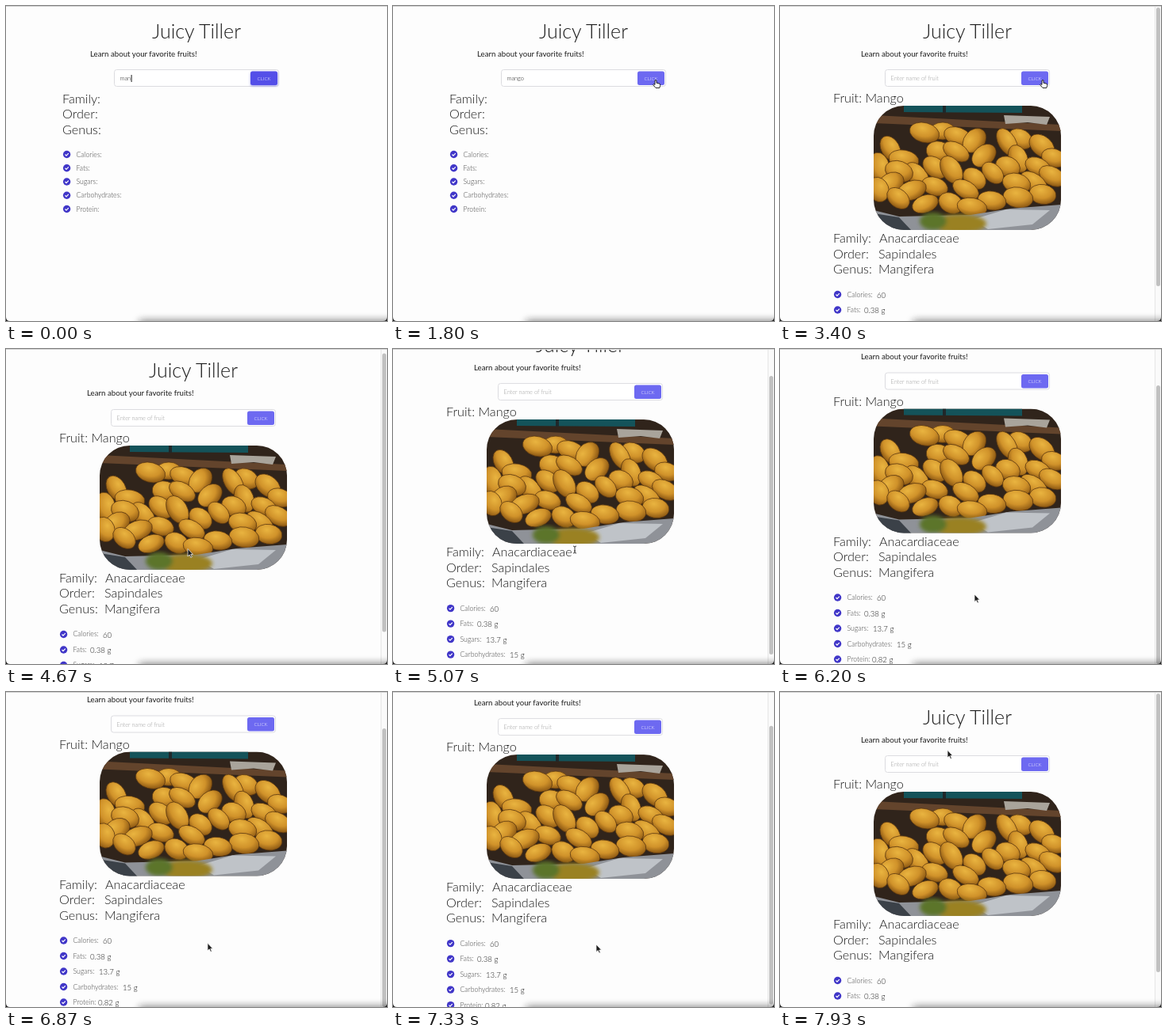
Recreate the animation shown at these times as an HTML page. Size 480 by 398 pixels, loop 8000 ms.

```html
<!DOCTYPE html>
<html lang="en">
<meta charset="utf-8">
<title>Juicy Tiller</title>
<style>
  html, body { margin: 0; width: 100%; height: 100%; overflow: hidden; background: #fdfdfd; }
  svg { display: block; width: 480px; height: 398px; font-family: Lato, sans-serif; font-weight: 300; fill: #1c1c1c; }
  .title { font-size: 25px; text-anchor: middle; }
  .intro { font-size: 9.7px; font-weight: 400; }
  .head { font-size: 16.2px; }
  .label { font-size: 8.7px; fill: #444; }
  .value { font-size: 9.6px; }
  .entry { font-size: 7.4px; }
  .click { font-size: 6.2px; fill: #fff; text-anchor: middle; }
</style>
<svg viewBox="0 0 480 398">
  <defs>
    <clipPath id="frame"><rect x="118" y="126" width="236" height="157" rx="38"/></clipPath>
    <radialGradient id="skin" cx=".4" cy=".3" r=".75">
      <stop stop-color="#e9b440"/><stop offset=".55" stop-color="#d0922a"/><stop offset="1" stop-color="#835010"/>
    </radialGradient>
    <filter id="soft"><feGaussianBlur stdDeviation="2.5"/></filter>
    <filter id="wide" x="-20%" y="-300%" width="140%" height="700%"><feGaussianBlur stdDeviation="5"/></filter>
  </defs>

  <g id="page">
    <text class="title" x="236" y="40.5">Juicy Tiller</text>
    <text class="intro" x="102" y="63.5">Learn about your favorite fruits!</text>
    <rect x="132.5" y="80.5" width="207" height="21" rx="3" fill="#fff" stroke="#dcdce0"/>
    <text class="entry" id="entry" x="139.5" y="94"></text>
    <rect id="caret" y="87" width="1" height="9"/>
    <rect id="button" x="304" y="82.5" width="34" height="17.5" rx="2.5"/>
    <text class="click" x="321" y="93.7">CLICK</text>
    <g id="empty"></g>
    <g id="result">
      <g id="photo" clip-path="url(#frame)">
        <rect x="118" y="126" width="236" height="157" fill="#30241b"/>
        <path d="M118 138L354 150V158L118 148z" fill="#63442c"/>
        <path d="M156 126H305V135L156 134z" fill="#14535a"/>
        <path d="M205 126h4v9h-4z" fill="#20282a"/>
        <path d="M282 138L340 140L336 150L312 147L284 149z" fill="#a9a49b"/>
      </g>
    </g>
  </g>

  <g id="bar">
    <path d="M472 1H480V398H472z" fill="#fafafa"/>
    <path d="M472.5 1V398" stroke="#e6e6e6"/>
    <rect id="thumb" x="474" width="5" height="352" rx="2.5" fill="#c1c1c1"/>
  </g>
  <rect x="168" y="397" width="340" height="10" opacity=".55" filter="url(#wide)"/>
  <path d="M0 .5H480" stroke="#d4d4d4"/>
  <path d="M0 393Q0 398 5 398H0zM480 393Q480 398 475 398H480z"/>
  <g id="pointer">
    <path id="arrow" d="M0 0V9.5L2.2 7.5L3.8 11L5.3 10.3L3.8 7H6.6z" stroke="#fff" stroke-width=".7"/>
    <path id="beam" d="M-2 -4.5Q0 -4.5 0 -3V3Q0 4.5 -2 4.5M2 -4.5Q0 -4.5 0 -3M0 3Q0 4.5 2 4.5M-1 1.5H1" fill="none" stroke="#222" stroke-width=".9"/>
    <path id="hand" d="M-1 0Q0 -1 1 0V3.2L5 4.2Q6 4.6 5.6 6.5L4.8 9.5H0L-3.4 5.4Q-3 4 -1 5.4z" fill="#fff" stroke="#111" stroke-width=".9"/>
  </g>
</svg>
<script>
const $ = id => document.getElementById(id);
const draw = (parent, markup) => parent.insertAdjacentHTML('beforeend', markup);
const show = (el, on) => el.style.display = on ? '' : 'none';

// Text blocks: [label, value, value x]
const heads = [['Family:', 'Anacardiaceae', 125], ['Order:', 'Sapindales', 124], ['Genus:', 'Mangifera', 124]];
const facts = [['Calories:', '60', 122], ['Fats:', '0.38 g', 106], ['Sugars:', '13.7 g', 117],
  ['Carbohydrates:', '15 g', 147], ['Protein:', '0.82 g', 116]];

function addDetails(group, headY, factY, factStep, filled) {
  const value = (cls, text, x, y) => filled ? `<text class="${cls}" x="${x}" y="${y}">${text}</text>` : '';
  heads.forEach(([label, text, x], i) => {
    const y = headY + i * 19.5;
    draw(group, `<text class="head" x="67" y="${y}">${label}</text>` + value('head', text, x, y));
  });
  facts.forEach(([label, text, x], i) => {
    const y = factY + i * factStep;
    draw(group, `<circle cx="72.6" cy="${y}" r="4.7" fill="#4036c8"/>
      <path d="M70.5 ${y}l1.5 1.6l2.8 -3" fill="none" stroke="#fff" stroke-width="1.2"/>
      <text class="label" x="84.5" y="${y + 3}">${label}</text>` + value('value', text, x, y + 4.2));
  });
}
addDetails($('empty'), 122.5, 187.5, 17.25, false);
draw($('result'), '<text class="head" x="67" y="122.3">Fruit: Mango</text>');
addDetails($('result'), 299, 364.5, 19.5, true);

// Heap of mangoes: x, y, tilt
const heap = [205,158,0, 182,160,15, 224,165,20, 245,170,-50, 303,168,30, 286,172,60, 330,177,40, 139,180,60,
  200,184,15, 156,194,10, 222,184,30, 257,189,-40, 345,192,20, 125,204,80, 300,193,70, 325,203,25, 287,203,25,
  173,214,50, 150,209,20, 195,204,40, 268,211,45, 216,207,60, 343,215,30, 140,224,-30, 245,218,40, 320,223,35,
  298,224,15, 195,228,20, 124,232,70, 166,233,-20, 234,232,30, 331,238,10, 149,243,40, 300,242,10, 267,246,10,
  183,250,-20, 215,249,30, 242,254,10];
for (let i = 0; i < heap.length; i += 3) {
  const [x, y, tilt] = heap.slice(i, i + 3);
  const rx = 16 + i % 4, ry = 11 + i % 5 * .5;
  draw($('photo'), `<ellipse rx="${rx}" ry="${ry}" transform="translate(${x} ${y}) rotate(${tilt})"
    fill="url(#skin)" stroke="#54330f" stroke-width=".7"/>`);
}
draw($('photo'), `<path d="M118 258L150 266L240 264L290 256L354 251V284H118z" fill="#8f9298"/>
  <path d="M242 270L285 257L340 258L318 276L262 282z" fill="#bfc3c8"/>
  <path d="M118 262L150 267L166 284H118z" fill="#3b4148"/>
  <g filter="url(#soft)"><ellipse cx="226" cy="275" rx="34" ry="12" fill="#9a8124"/>
  <ellipse cx="193" cy="272" rx="17" ry="11" fill="#5c752b"/></g>`);

// Keyframes are [time, ...values]; each span eases in and out.
const scrollKeys = [[4530, 0], [5330, 49], [5500, 49], [6000, 50.5], [7220, 50.5], [7900, 0]];
const pointerKeys = [[870, 86, 150], [1450, 360, 112], [1800, 331, 94], [3400, 331, 94], [3900, 262, 322],
  [4130, 276, 272], [4330, 229, 252], [5400, 229, 254], [6100, 245, 310], [6400, 245, 310],
  [7050, 256, 319], [7450, 256, 319], [7900, 211, 73.5]];

function sample(keys, t) {
  const next = keys.findIndex(k => k[0] > t);
  if (next < 1) return (next ? keys.at(-1) : keys[0]).slice(1);
  const a = keys[next - 1], b = keys[next];
  const p = (t - a[0]) / (b[0] - a[0]), ease = p * p * (3 - 2 * p);
  return a.slice(1).map((v, i) => v + (b[i + 1] - v) * ease);
}

function pointerKind(x, y, loaded) {
  if (x > 304 && x < 340 && y > 82 && y < 101) return 'hand';
  if (x > 132 && x < 304 && y > 80 && y < 102) return 'beam';
  if (loaded && x < 235 && y > 284 && y < 342) return 'beam';
  return 'arrow';
}

function frame() {
  const t = performance.now() % 8000;
  const loaded = t >= 2270;
  const shift = loaded ? 0 : 4;
  const [scroll] = sample(scrollKeys, t);
  const [x, y] = sample(pointerKeys, t);

  $('page').setAttribute('transform', `translate(${shift} ${-scroll})`);
  show($('empty'), !loaded);
  show($('result'), loaded);
  show($('bar'), loaded);
  $('thumb').setAttribute('y', 2 + scroll * .87);

  const entry = $('entry');
  entry.textContent = loaded ? 'Enter name of fruit' : 'mango'.slice(0, t < 70 ? 3 : t < 200 ? 4 : 5);
  entry.style.fill = loaded ? '#999' : '';
  show($('caret'), t < 730 || t >= 1230 && t < 1730);
  $('caret').setAttribute('x', 140 + entry.getComputedTextLength());
  const idle = t < 1730;
  $('button').style.fill = idle ? '#544fe8' : '#6d69f1';
  $('button').style.filter = idle ? 'drop-shadow(0 1.5px 1.5px #5a55e0a0)' : '';

  show($('pointer'), t >= 870);
  $('pointer').setAttribute('transform', `translate(${x} ${y})`);
  const kind = pointerKind(x - shift, y + scroll, loaded);
  for (const id of ['arrow', 'beam', 'hand']) show($(id), id === kind);
  requestAnimationFrame(frame);
}
frame();
</script>
</html>
```
